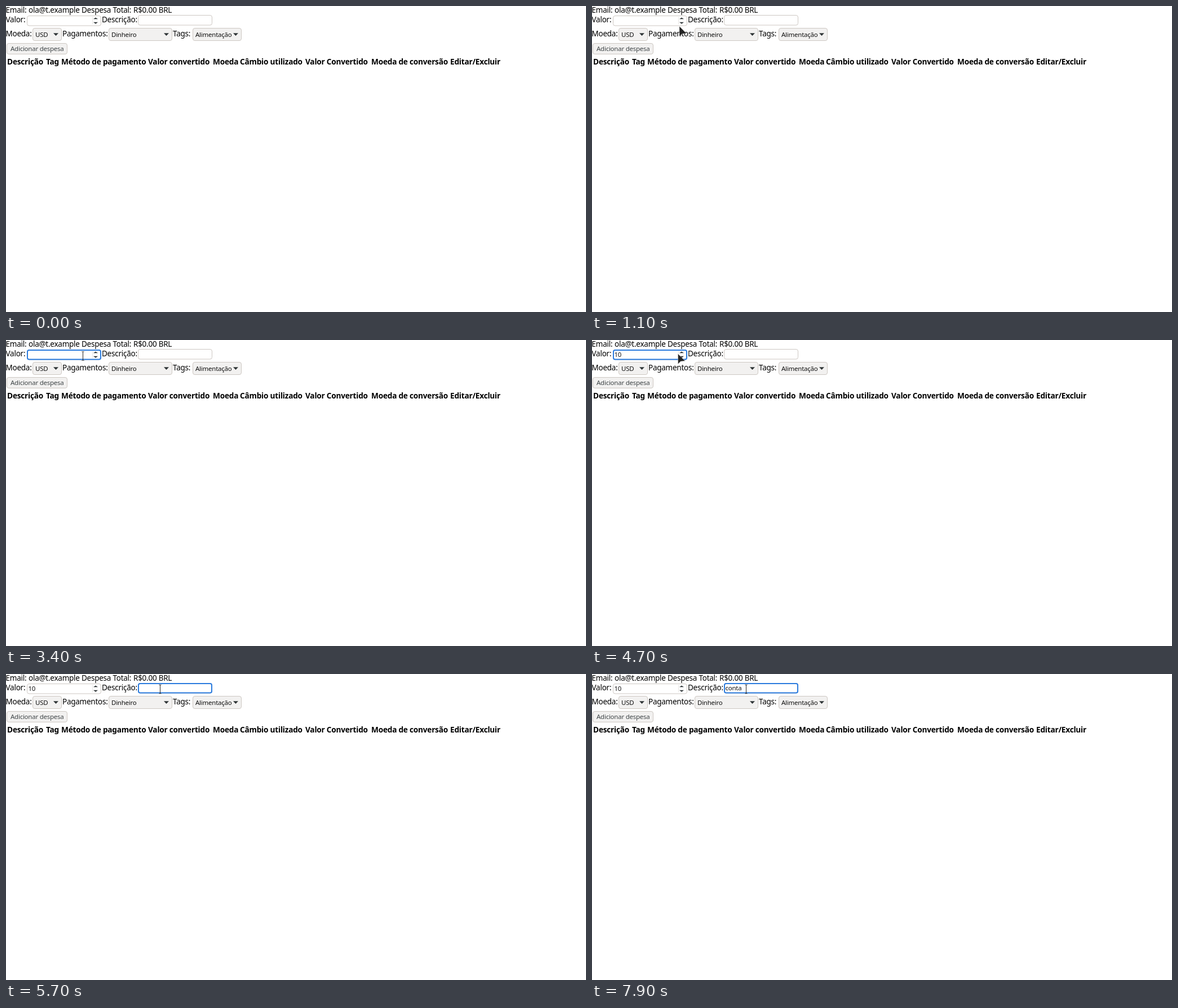
These frames come from a looping animation (1029 by 544 pixels, 8 s). An HTML page:

```html
<!DOCTYPE html>
<html lang="pt-BR">
<head>
<meta charset="utf-8">
<title>Despesas</title>
<style>
  html, body { margin: 0; width: 100%; height: 100%; overflow: hidden; background: #fff; }
  svg { display: block; width: 1029px; height: 544px; }
  text { font-family: "Noto Sans", "Open Sans", sans-serif; font-size: 13.5px; letter-spacing: -.25px; fill: #000; white-space: pre; }
  .head { font-size: 13.7px; font-weight: 700; }
  .small { font-size: 11.5px; fill: #111; }
  .button { fill: #3f4547; }
  .box { fill: #fff; stroke: #cdc7c2; }
  .control { fill: #f2f1f0; }
  .hover { fill: #f8f8f7; }
  .focus { fill: #fff; stroke: #2a7bde; stroke-width: 2; }
  .arrow { fill: #2e3436; }
</style>
</head>
<body>
<svg id="stage" viewBox="0 0 1029 544"></svg>
<script>
const LOOP = 8000;
const stage = document.getElementById("stage");

function add(tag, attrs, content = "") {
  const el = document.createElementNS("http://www.w3.org/2000/svg", tag);
  for (const key in attrs) el.setAttribute(key, attrs[key]);
  el.textContent = content;
  return stage.appendChild(el);
}
const label = (x, y, content, cls = "") => add("text", { x, y, class: cls }, content);
const box = (x, y, width, height, cls) =>
  add("rect", { x: x + .5, y: y + .5, width: width - 1, height: height - 1, rx: 3.5, class: cls });
const shape = (d, attrs) => add("path", { d, ...attrs });
const show = (el, on) => el.setAttribute("visibility", on ? "visible" : "hidden");

function select(x, width, content) {
  const el = box(x, 39, width, 23, "box control");
  label(x + 5, 54.5, content, "small");
  shape(`M${x + width - 15} 48.3h9l-4.5 4.8z`, { class: "arrow" });
  return el;
}

function field(x, y) {
  const textX = x + 3;
  box(x, y, 132, 18.5, "box");
  return {
    ring: add("rect", { x: x + 1, y: y + 1, width: 130, height: 16.5, rx: 3, class: "focus" }),
    text: label(textX - .5, y + 13.2, "", "small"),
    caret: add("rect", { x: textX, y: y + 3, width: 1, height: 13 }),
    x: textX
  };
}

label(-.5, 12, "Email:");
label(40, 12, "ola@t.example");
label(134, 12, "Despesa Total:");
label(226, 12, "R$0.00 BRL");
label(-.5, 29, "Valor:");
label(170, 29, "Descrição:");
label(-.5, 54, "Moeda:");
label(100, 54, "Pagamentos:");
label(296, 54, "Tags:");

const amount = field(37, 17);
const note = field(234, 16);
shape("M153.5 19.5v13", { stroke: "#e8e6e4" });
shape("M155 23.3l4-2.9 4 2.9zM155 28.8l4 2.9 4-2.9z", { class: "arrow" });

select(47, 52, "USD");
const payment = select(182, 113, "Dinheiro");
select(331, 87, "Alimentação");
box(1, 66, 108, 20, "box control");
label(8, 79.7, "Adicionar despesa", "small button");

[[2, "Descrição"], [71, "Tag"], [98, "Método de pagamento"], [252, "Valor convertido"],
 [367, "Moeda"], [415, "Câmbio utilizado"], [531, "Valor Convertido"],
 [648, "Moeda de conversão"], [788, "Editar/Excluir"]
].forEach(([x, content]) => label(x, 103.5, content, "head"));

const pointer = shape("M0 0V18.3L4.8 13.6 12.6 12.8Z", { fill: "#242424", stroke: "#fff", "stroke-width": .4 });
const beam = shape("M0 -7.5V7.5M-2 -8Q0 -8 0 -7Q0 -8 2 -8M-2 8Q0 8 0 7Q0 8 2 8",
  { fill: "none", stroke: "#222" });

// time, x, y, kind of cursor
const moves = [
  [0, 0, 0, ""], [200, 1017, 186, "pointer"], [300, 720, 118, "pointer"],
  [400, 430, 70, "pointer"], [500, 250, 47, "pointer"], [600, 192.5, 39, "pointer"],
  [700, 180, 39, "pointer"], [800, 174, 38, "pointer"], [900, 171, 38, "pointer"],
  [1000, 169, 37.5, "pointer"], [1100, 155, 36, "pointer"], [1200, 135, 35, "pointer"],
  [1300, 118.5, 32, "beam"], [1400, 116.5, 31.5, "beam"], [1900, 128.5, 30, "beam"],
  [2000, 136.5, 28.5, "beam"], [4700, 152.5, 24.5, "pointer"],
  [4800, 215, 30, "pointer"], [4900, 273.5, 27, "beam"]
];

// time, focused field, its text, caret on
const edits = [
  [0, null, "", 0],
  [1700, amount, "", 1], [2200, amount, "", 0], [2800, amount, "", 1], [3400, amount, "", 0],
  [3700, amount, "1", 1], [3800, amount, "10", 1], [4500, amount, "10", 0],
  [5100, note, "", 1], [5700, note, "", 0], [6100, note, "c", 1], [6200, note, "co", 1],
  [6400, note, "con", 1], [6900, note, "cont", 1], [7300, note, "conta", 1], [7900, note, "conta", 0]
];

const at = (steps, time) => steps.findLast(step => step[0] <= time);

function render(time) {
  const [, x, y, kind] = at(moves, time);
  show(pointer, kind === "pointer");
  show(beam, kind === "beam");
  pointer.setAttribute("transform", `translate(${x} ${y})`);
  beam.setAttribute("transform", `translate(${x} ${y})`);
  payment.classList.toggle("hover", kind === "pointer" && x > 182 && x < 294 && y >= 39 && y < 62);

  const [, active, typed, caretOn] = at(edits, time);
  for (const f of [amount, note]) {
    const on = f === active;
    f.text.textContent = on ? typed : f === amount && active === note ? "10" : "";
    show(f.ring, on);
    show(f.caret, on && caretOn);
    if (on) f.caret.setAttribute("x", f.x + (typed ? Math.floor(f.text.getComputedTextLength()) : 0));
  }
}

const start = performance.now();
function tick() {
  render((performance.now() - start) % LOOP);
  requestAnimationFrame(tick);
}
tick();
</script>
</body>
</html>
```
